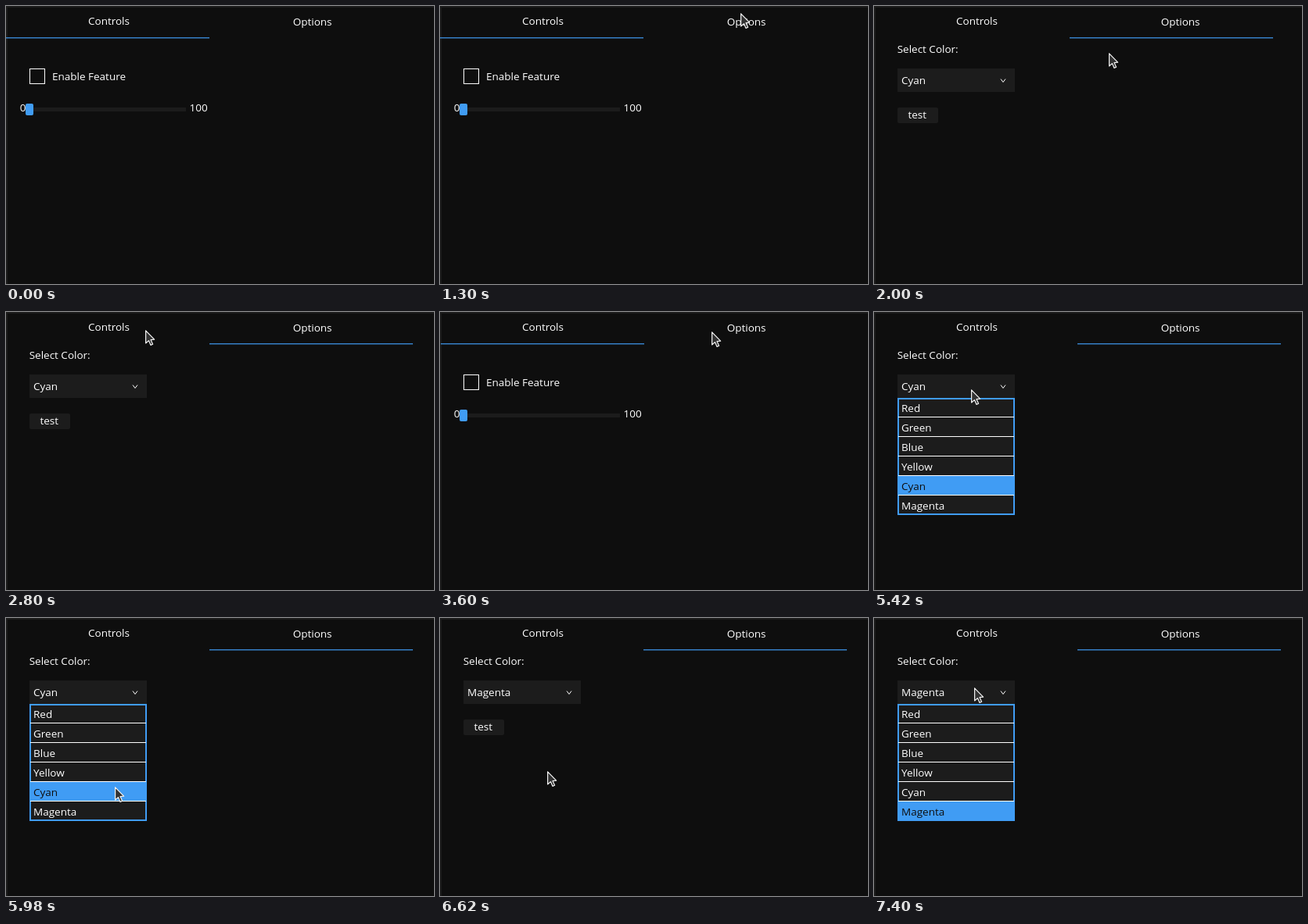
An HTML page that plays this animation: 547x356 px, repeating every 8000 ms.

```html
<!DOCTYPE html>
<html lang="en">
<head>
<meta charset="utf-8">
<title>Tabs and combo box</title>
<style>
  html, body { margin: 0; width: 100%; height: 100%; overflow: hidden; background: #0e0e0e; }
  svg { display: block; width: 547px; height: 356px; }
  text { font: 13.5px "Open Sans", "Noto Sans", sans-serif; fill: #fff; }
  .panel { fill: #1c1c1c; }
  .accent { fill: #409cf4; }
  .row.hover rect { fill: #409cf4; }
  .row.hover text { fill: #0e0e0e; }
</style>
</head>
<body>
<svg viewBox="0 0 547 356">
  <path class="panel" d="M0 0H547V2H2V356H0Z"/>
  <text x="105" y="24">Controls</text>
  <text x="366.7" y="25">Options</text>
  <rect id="underline" class="accent" y="40.2" width="260" height="1.2"/>

  <g id="controls">
    <rect x="30.5" y="80.5" width="19" height="19" fill="none" stroke="#fff"/>
    <text x="59" y="95">Enable Feature</text>
    <rect class="panel" x="30" y="130" width="200" height="5"/>
    <text x="17.7" y="135">0</text>
    <text x="234.5" y="135">100</text>
    <rect class="accent" x="25" y="125" width="10" height="15" rx="2"/>
  </g>

  <g id="options">
    <text x="29.7" y="60">Select Color:</text>
    <rect class="panel" x="30" y="80" width="150" height="30"/>
    <text id="choice" x="35" y="100"></text>
    <path d="M162 93.5L165 97.5L168 93.5" fill="none" stroke="#fff"/>
    <rect class="panel" x="30" y="130" width="52" height="20" rx="2"/>
    <text x="55.2" y="144" text-anchor="middle">test</text>
    <g id="list"></g>
  </g>

  <path id="cursor" d="M.6 .8V17L4.4 13.6L7 19.4L9.6 18.2L7 12.6L11.6 12.2Z"
        fill="#333" stroke="#f2f2f2" stroke-width="1.2" stroke-linejoin="round"/>
</svg>
<script>
const LOOP = 8000, FIRST = 340, TICK = 79.3;
const COLORS = ["Red", "Green", "Blue", "Yellow", "Cyan", "Magenta"];
const LIST_TOP = 110, ROW = 25, CYAN = 4, MAGENTA = 5;

// each click switches to the other tab
const TAB_CLICKS = [1402, 2858, 3884], TAB_WIDTH = 260, SLIDE = 800;
const OPEN = 5240, PICK = 6440, REOPEN = 7310;

// places the pointer glides between
const STOPS = [
  { at: 340, x: 220, y: 147 },
  { at: 780, x: 471, y: 40 },
  { at: 1292, x: 384, y: 9 },
  { at: 2000, x: 300, y: 60 },
  { at: 2798, x: 178, y: 23 },
  { at: 3884, x: 384, y: 26 },
  { at: 4384, x: 376, y: 49 },
  { at: 5415, x: 124, y: 99 },
  { at: 5970, x: 139, y: 216 },
  { at: 6210, x: 140, y: 240 },
  { at: 7320, x: 128, y: 89 }
];

const $ = id => document.getElementById(id);
const show = (id, on) => $(id).setAttribute("display", on ? "inline" : "none");
const mix = (a, b, p) => a + (b - a) * p;
const smooth = p => p * p * (3 - 2 * p);

const rowTop = i => LIST_TOP + i * ROW;
$("list").innerHTML =
  COLORS.map((name, i) => `<g class="row">
    <rect class="panel" x="30" y="${rowTop(i)}" width="150" height="${ROW}"/>
    <text x="35" y="${rowTop(i) + 18}">${name}</text></g>`).join("") +
  `<rect x="31" y="111" width="148" height="148" fill="none" stroke="#409cf4" stroke-width="2"/>` +
  COLORS.slice(1).map((_, i) =>
    `<rect x="31" y="${rowTop(i + 1) - 1}" width="148" height="1" fill="#fff"/>`).join("");
const rows = [...document.querySelectorAll(".row")];

// cubic-bezier(.25, .1, .25, 1), solved by bisection
function ease(p) {
  if (p >= 1) return 1;
  let lo = 0, hi = 1;
  for (let i = 0; i < 20; i++) {
    const s = (lo + hi) / 2;
    if (.75 * s * (1 - s) + s ** 3 < p) lo = s; else hi = s;
  }
  return .3 * lo * (1 - lo) ** 2 + 3 * lo * lo * (1 - lo) + lo ** 3;
}

function pointerAt(t) {
  const next = STOPS.findIndex(stop => stop.at > t);
  if (next < 1) return STOPS.at(next);
  const a = STOPS[next - 1], b = STOPS[next];
  const p = smooth((t - a.at) / (b.at - a.at));
  return { x: Math.round(mix(a.x, b.x, p)), y: Math.round(mix(a.y, b.y, p)) };
}

function hoveredRow(t, y) {
  if (t >= PICK) return MAGENTA;
  const row = Math.floor((y - LIST_TOP) / ROW);
  return t >= OPEN && row >= 0 ? row : CYAN;
}

function render(time) {
  // the picture is refreshed once per tick
  const tick = Math.floor((time - FIRST + 6) / TICK);
  const t = tick < 0 ? 0 : FIRST + tick * TICK;

  const clicks = TAB_CLICKS.filter(at => at <= t);
  const tab = clicks.length % 2;
  const slide = clicks.length ? ease((t - clicks.at(-1)) / SLIDE) : 1;
  $("underline").setAttribute("x", Math.round(TAB_WIDTH * mix(1 - tab, tab, slide)));
  show("controls", tab === 0);
  show("options", tab === 1);

  const { x, y } = pointerAt(t);
  show("cursor", tick >= 0);
  $("cursor").setAttribute("transform", `translate(${x} ${y})`);

  show("list", (t >= OPEN && t < PICK) || t >= REOPEN);
  const hover = hoveredRow(t, y);
  rows.forEach((row, i) => row.classList.toggle("hover", i === hover));
  $("choice").textContent = COLORS[t >= PICK ? MAGENTA : CYAN];
}

const start = performance.now();
function frame() {
  render((performance.now() - start) % LOOP);
  requestAnimationFrame(frame);
}
frame();
</script>
</body>
</html>
```
